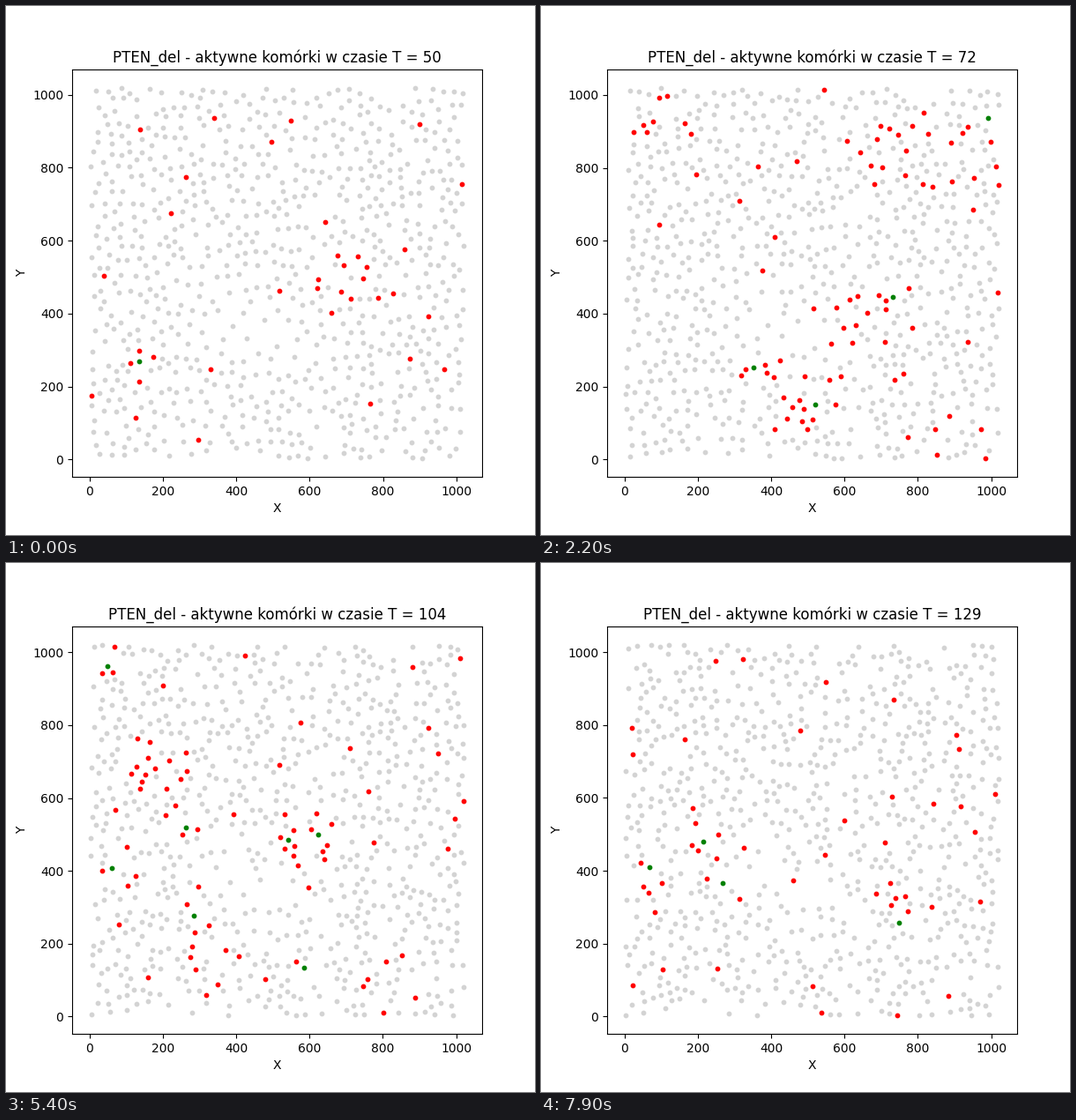
A matplotlib script that plays this animation: 600 px wide and 600 px high, repeating every 8 s.

```python
import numpy as np
import matplotlib.pyplot as plt
from matplotlib.animation import FuncAnimation

FRAMES, INTERVAL, FIRST_T = 80, 100, 50
CELLS, LOW, HIGH, SPACING = 800, 3, 1020, 22
WAVES, SINGLES = 46, 360
REACH, SPEED, LIFE, RESPONSE = 90, 18, 7, 0.5
# Strongest waves: start frame, x, y
MAIN_WAVES = [(-3, 140, 262), (10, 440, 840), (10, 905, 405), (28, 820, 690),
              (28, 250, 160), (51, 250, 530), (51, 560, 490), (65, 185, 145),
              (65, 770, 870), (76, 215, 490)]
rng = np.random.default_rng(12)


def scatter_cells():
    """Darts with a minimum spacing that widens around one sparse patch."""
    cells = rng.uniform(LOW, HIGH, (1, 2))
    while len(cells) < CELLS:
        dart = rng.uniform(LOW, HIGH, 2)
        patch = np.exp(-((dart[0] - 440) / 150) ** 2 - ((dart[1] - 350) / 90) ** 2)
        if np.hypot(*(cells - dart).T).min() > SPACING * (1 + patch):
            cells = np.vstack([cells, dart])
    return cells


def push_apart(cells):
    offsets = cells[:, None] - cells[None]
    gaps = np.hypot(offsets[..., 0], offsets[..., 1]) + 1e-9
    push = np.clip(1 - SPACING / gaps, -1, 0) * -0.5
    np.fill_diagonal(push, 0)
    return cells + (offsets * push[..., None]).sum(axis=1)


def drift(cells):
    """Jittery walk with a slow heading for each cell, kept free of overlaps."""
    heading = rng.normal(0, 0.2, cells.shape)
    paths = [cells]
    for _ in range(FRAMES - 1):
        moved = paths[-1] + heading + rng.normal(0, 1, cells.shape)
        paths.append(np.clip(push_apart(moved), LOW, HIGH))
    return np.array(paths)


def switch_on(mask, cells, starts):
    age = np.arange(FRAMES)[:, None] - starts
    mask[:, cells] |= (age >= 0) & (age < LIFE)


def add_wave(start, x, y):
    """A green cell fires, then part of its neighbourhood follows outwards."""
    cells = paths[int(np.clip(start, 0, FRAMES - 1))]
    gaps = np.hypot(*(cells - (x, y)).T)
    switch_on(starting, [gaps.argmin()], start)
    answers = (gaps < REACH) & (rng.random(CELLS) < RESPONSE)
    switch_on(active, answers, start + gaps[answers] / SPEED)


paths = drift(scatter_cells())
active = np.zeros((FRAMES, CELLS), bool)
starting = np.zeros((FRAMES, CELLS), bool)

for wave in MAIN_WAVES:
    add_wave(*wave)
for _ in range(WAVES):
    add_wave(rng.uniform(-LIFE - 3, FRAMES), *rng.uniform(LOW, HIGH, 2))
for cell in rng.integers(0, CELLS, SINGLES):
    switch_on(active, [cell], rng.uniform(-LIFE, FRAMES))

fig, ax = plt.subplots(figsize=(6, 6), dpi=100)


def draw(frame):
    ax.clear()
    green = starting[frame]
    red = active[frame] & ~green
    for mask, color in ((~(red | green), "lightgray"), (red, "red"), (green, "green")):
        ax.scatter(*paths[frame][mask].T, s=10, color=color)
    ax.set_title(f"PTEN_del - aktywne komórki w czasie T = {FIRST_T + frame}")
    ax.set_xlabel("X")
    ax.set_ylabel("Y")


anim = FuncAnimation(fig, draw, frames=FRAMES, interval=INTERVAL,
                     init_func=lambda: None, repeat=True, repeat_delay=0)
plt.show()
```
